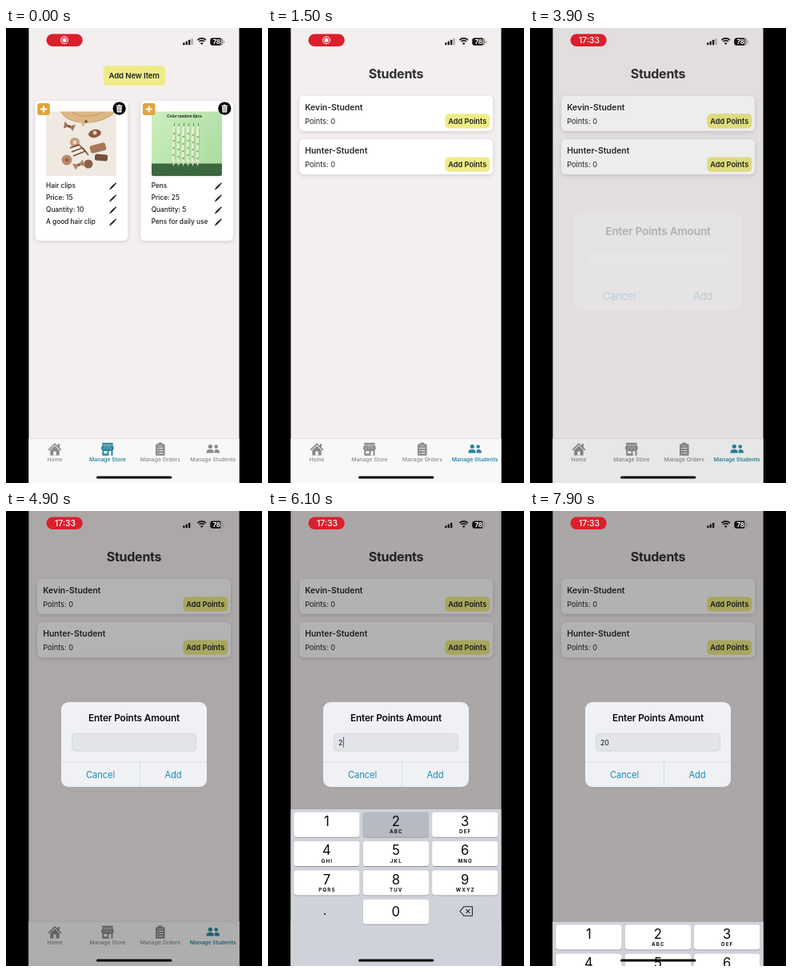
An HTML page with a canvas that plays this animation: 320x569 px, repeating every 8000 ms.

```html
<!DOCTYPE html>
<html lang="en">
<head>
<meta charset="utf-8">
<title>Classroom store</title>
<style>
html, body { margin: 0; width: 100%; height: 100%; overflow: hidden; background: #000; }
canvas { display: block; width: 100%; height: 100%; }
</style>
</head>
<body>
<canvas id="stage"></canvas>
<script>
const W = 320, H = 569, LOOP = 8000;
const canvas = document.getElementById('stage');
const c = canvas.getContext('2d');
const ratio = window.devicePixelRatio || 1;
canvas.width = W * ratio;
canvas.height = H * ratio;

const PAGE = '#f4efef', YELLOW = '#efec88', INK = '#222', TEAL = '#2b87a1', GRAY = '#8b8b8c', LINK = '#1a8abb';

// Moments of the story, in ms
const T = { tab: 1200, clock: 2600, alert: 3860, keysIn: 5210, two: 6080, zero: 6520, keysOut: 7763 };

function spring(ms, w) {
  if (ms <= 0) return 0;
  const x = w * ms / 1000;
  return 1 - (1 + x) * Math.exp(-x);
}

function box(x, y, w, h, r, fill, stroke, line = 1) {
  c.beginPath();
  c.roundRect(x, y, w, h, r);
  if (fill) { c.fillStyle = fill; c.fill(); }
  if (stroke) { c.strokeStyle = stroke; c.lineWidth = line; c.stroke(); }
}

function disc(x, y, r, fill) {
  c.beginPath();
  c.arc(x, y, r, 0, Math.PI * 2);
  c.fillStyle = fill;
  c.fill();
}

function poly(points, fill) {
  c.beginPath();
  points.forEach(([x, y]) => c.lineTo(x, y));
  c.closePath();
  c.fillStyle = fill;
  c.fill();
}

function line(points, color, width) {
  c.beginPath();
  points.forEach(([x, y], i) => i ? c.lineTo(x, y) : c.moveTo(x, y));
  c.strokeStyle = color;
  c.lineWidth = width;
  c.stroke();
}

// y is the middle of the capital letters
function text(s, x, y, size, weight = 400, color = INK, align = 'left', gap = 0) {
  c.font = `${weight} ${size}px Inter, "Liberation Sans", sans-serif`;
  c.letterSpacing = gap + 'px';
  c.textAlign = align;
  c.fillStyle = color;
  c.fillText(s, x, y + size * 0.364);
}

function shadowed(blur, dy, alpha, draw) {
  c.save();
  c.shadowColor = `rgba(60,40,40,${alpha})`;
  c.shadowBlur = blur * ratio;
  c.shadowOffsetY = dy * ratio;
  draw();
  c.restore();
}

function at(x, y, draw, angle = 0) {
  c.save();
  c.translate(x, y);
  c.rotate(angle);
  draw();
  c.restore();
}

function clipped(x, y, w, h, r, draw) {
  c.save();
  c.beginPath();
  c.roundRect(x, y, w, h, r);
  c.clip();
  draw();
  c.restore();
}

function pencil(x, y) {
  at(x, y, () => {
    box(-3.6, -0.9, 7.2, 1.8, 0.2, '#111');
    poly([[-3.9, -0.9], [-6.2, 0], [-3.9, 0.9]], '#111');
    box(4.1, -0.9, 1.8, 1.8, 0.5, '#111');
  }, -Math.PI / 4);
}

function trash(x, y) {
  disc(x, y, 8.1, '#050505');
  box(x - 3.9, y - 3.8, 7.8, 1.1, 0.4, '#fff');
  box(x - 1.4, y - 4.8, 2.8, 1.4, 0.5, '#fff');
  poly([[x - 3.3, y - 2], [x + 3.3, y - 2], [x + 2.8, y + 5], [x - 2.8, y + 5]], '#fff');
  for (const dx of [-1.4, 0, 1.4]) line([[x + dx, y - 0.9], [x + dx, y + 3.9]], '#222', 0.5);
}

function plus(x, y) {
  box(x, y, 15.6, 15, 3, '#dfa53d');
  line([[x + 3.8, y + 7.5], [x + 11.8, y + 7.5]], '#fff', 1.8);
  line([[x + 7.8, y + 3.5], [x + 7.8, y + 11.5]], '#fff', 1.8);
}

function bow(x, y, color, angle) {
  at(x, y, () => {
    poly([[0, 0], [-7, -4.5], [-6, 4.5]], color);
    poly([[0, 0], [7, -4.5], [6, 4.5]], color);
    disc(0, 0, 1.8, '#7b5238');
  }, angle);
}

function clipsPhoto() {
  box(50, 104, 88, 81, 0, '#f0e9e2');
  c.beginPath();
  c.ellipse(104, 98, 36, 20, -0.1, 0, Math.PI * 2);
  c.fillStyle = '#dcb887';
  c.fill();
  c.strokeStyle = '#c4965f';
  c.lineWidth = 1;
  c.stroke();
  c.beginPath();
  c.ellipse(104, 98, 24, 12, -0.1, 0, Math.PI * 2);
  c.stroke();
  bow(79, 123, '#a57353', 0.3);
  bow(100, 117, '#d9b993', -0.5);
  disc(86, 143, 6, '#c79a78');
  disc(86, 143, 2.4, '#ead7c3');
  c.beginPath();
  c.ellipse(111, 132, 8, 5, -0.2, 0, Math.PI * 2);
  c.fillStyle = '#8a5a3d';
  c.fill();
  disc(111, 131, 2.5, '#e8cdb2');
  for (let i = 0; i < 3; i++) {
    line([[80 + i * 2, 150 + i * 5], [91 + i * 4, 146 + i * 4], [99 + i * 2, 153 + i * 3]], '#704832', 1.4);
  }
  at(115, 150, () => box(-10, -5, 20, 10, 3, '#a9785b'), -0.25);
  at(119, 162, () => box(-8, -4, 16, 8, 2, '#74503d'), 0.1);
  bow(91, 171, '#b57f62', -0.4);
  disc(76, 165, 6.5, '#b98b6b');
  disc(76, 165, 2.5, '#93654a');
  disc(103, 170, 5.5, '#8b6148');
}

function pensPhoto() {
  const g = c.createLinearGradient(182, 104, 270, 172);
  g.addColorStop(0, '#cdeebf');
  g.addColorStop(1, '#a9dca0');
  box(182, 104, 88, 81, 0, g);
  box(182, 169.5, 88, 16, 0, '#3c6840');
  text('Color random 6pcs', 223, 110, 4.7, 'italic 700', '#18251a', 'center');
  for (let i = 0; i < 6; i++) {
    at(210 + i * 6, 146, () => {
      box(-0.6, -27, 1.2, 5, 0.5, '#6f9a65');
      box(-1.9, -23, 3.8, 45, 1.4, '#e6f2d5');
      box(0.8, -22, 1.1, 42, 0.4, '#a1c68a');
      for (let k = 0; k < 4; k++) disc(-0.4, -14 + k * 9 + (i % 3) * 2, 1.2, '#82b46d');
      poly([[-1.8, 21], [1.8, 21], [0, 27]], '#d6ddc2');
    }, 0.02);
  }
}

function storeCard(x, rows, photo) {
  shadowed(5, 1.5, 0.17, () => box(x, 91, 115.6, 175, 5, '#fff'));
  clipped(x + 13.6, 104.5, 88, 80.8, 3, photo);
  plus(x + 2.6, 94);
  trash(x + 105, 100.6);
  rows.forEach((row, i) => {
    const y = 197.3 + i * 15;
    text(row, x + 13.4, y, 8.3, 500, '#1d1d1d');
    pencil(x + 96.8, y + 0.8);
  });
}

function storePage() {
  box(121.6, 47, 77.4, 25, 5, YELLOW);
  text('Add New Item', 160.2, 59.7, 9.6, 600, INK, 'center', -0.13);
  storeCard(36.6, ['Hair clips', 'Price: 15', 'Quantity: 10', 'A good hair clip'], clipsPhoto);
  storeCard(168.3, ['Pens', 'Price: 25', 'Quantity: 5', 'Pens for daily use'], pensPhoto);
}

function studentsPage() {
  text('Students', 160, 57.6, 16, 700, '#303030', 'center', -0.24);
  ['Kevin-Student', 'Hunter-Student'].forEach((name, i) => {
    const y = 85 + i * 54.2;
    shadowed(5, 1.5, 0.17, () => box(39.3, y, 241.6, 43.7, 5, '#fff'));
    text(name, 46.2, y + 14, 10.4, 600, '#2a2a2a');
    text('Points: 0', 46.2, y + 31.3, 9.2, 400, '#222');
    box(221.4, y + 22.2, 56, 18.3, 5, YELLOW);
    text('Add Points', 249.2, y + 31.4, 9.2, 600, INK, 'center');
  });
}

const icons = [
  col => {
    poly([[-8.5, 0.6], [0, -7.8], [8.5, 0.6], [7.4, 1.7], [0, -5.5], [-7.4, 1.7]], col);
    poly([[-5.7, 1.2], [0, -4.2], [5.7, 1.2], [5.7, 7.7], [-5.7, 7.7]], col);
    box(3.8, -6.8, 2.2, 4.5, 0, col);
    box(-1.7, 2.8, 3.4, 4.9, 0, '#f9f8f8');
  },
  col => {
    box(-6.8, -8, 13.6, 2.2, 0.6, col);
    poly([[-6.6, -5.2], [6.6, -5.2], [8, -1.5], [-8, -1.5]], col);
    for (let i = 0; i < 4; i++) {
      disc(-6 + i * 4, -0.9, 1.9, col);
      line([[-3 + i * 2, -5], [-4 + i * 8 / 3, -1.2]], '#f9f8f8', 0.4);
    }
    box(-6.6, 0, 13.2, 8, 0.6, col);
    box(-4.6, 2.2, 4.2, 3.4, 0, '#f9f8f8');
    box(1.6, 2.2, 3, 5.8, 0, '#f9f8f8');
  },
  col => {
    box(-5.8, -6.5, 11.6, 14.5, 1.5, col);
    box(-2.6, -8.2, 5.2, 3.4, 1, col);
    line([[-2.6, -4.3], [2.6, -4.3]], '#f9f8f8', 0.6);
    for (let i = 0; i < 3; i++) {
      disc(-3.2, -1.3 + i * 3.2, 0.75, '#f9f8f8');
      line([[-1.4, -1.3 + i * 3.2], [3.6, -1.3 + i * 3.2]], '#f9f8f8', 1);
    }
  },
  col => {
    disc(-3.4, -3.4, 2.6, col);
    disc(4, -3.2, 2.3, col);
    box(-8.3, 0.3, 9.4, 4.4, [4, 4, 0.5, 0.5], col);
    box(2, 0.3, 6.3, 4.4, [2, 4, 0.5, 0.5], col);
  }
];

function tabBar(active) {
  box(28, 513.5, 264, 56, 0, '#f9f8f8');
  box(28, 513.2, 264, 0.6, 0, '#d9d5d5');
  ['Home', 'Manage Store', 'Manage Orders', 'Manage Students'].forEach((label, i) => {
    const x = 61 + i * 65.9, on = i === active, col = on ? TEAL : GRAY;
    at(x, 526.7, () => icons[i](col));
    text(label, x, 539.8, 6.8, on ? 600 : 500, col, 'center');
  });
}

function statusBar(showClock) {
  box(50.5, 7.6, 45.3, 15.4, 7.7, '#dc1f2c');
  if (showClock) {
    text('17:33', 74, 15.3, 10.3, 500, '#fff', 'center');
  } else {
    disc(73, 15.2, 2.6, '#fff');
    c.beginPath();
    c.arc(73, 15.2, 4.5, 0, Math.PI * 2);
    c.strokeStyle = '#fff';
    c.lineWidth = 1;
    c.stroke();
  }
  for (let i = 0; i < 4; i++) {
    const h = 3 + i * 1.75;
    box(221.2 + i * 3.4, 21.2 - h, 2.3, h, 0.6, i < 3 ? '#111' : '#a9a5a5');
  }
  c.strokeStyle = '#111';
  c.lineWidth = 1.6;
  for (const r of [7.4, 4.7]) {
    c.beginPath();
    c.arc(244.7, 20.3, r, -Math.PI * 0.75, -Math.PI * 0.25);
    c.stroke();
  }
  poly([[242.9, 18.9], [244.7, 18], [246.5, 18.9], [244.7, 21]], '#111');
  clipped(255.3, 12.6, 16, 9.2, 3, () => {
    box(255, 12, 17, 11, 0, '#96928f');
    box(255, 12, 13, 11, 0, '#111');
  });
  box(272, 15.7, 1.1, 3.2, [0, 1, 1, 0], '#96928f');
  text('78', 263.2, 17.3, 8, 700, '#fff', 'center', -0.2);
}

function alertBox(p, t) {
  c.save();
  c.globalAlpha = p;
  c.translate(160, 292);
  c.scale(1.2 - 0.2 * p, 1.2 - 0.2 * p);
  c.translate(-160, -292);
  box(69, 239, 182, 106, 9, '#eff1f5');
  text('Enter Points Amount', 160, 258.9, 11.9, 600, '#0d0d0d', 'center', -0.18);
  box(82.6, 278.2, 155, 22, 4, '#e2e4e9', '#cdd1d6', 0.7);
  line([[69, 314], [251, 314]], '#d0d3d8', 0.7);
  line([[167.5, 314], [167.5, 345]], '#d0d3d8', 0.7);
  text('Cancel', 118, 329.6, 11.2, 400, LINK, 'center', -0.1);
  text('Add', 209, 329.6, 11.2, 400, LINK, 'center', -0.1);
  const typed = t < T.two ? '' : t < T.zero ? '2' : '20';
  text(typed, 88, 289.5, 8.8, 400, '#111');
  if (t >= T.keysIn && t < T.keysOut) {
    box(88.2 + typed.length * 5.6, 282.4, 1.2, 13.4, 0.5, '#347fa5');
  }
  c.restore();
}

const letters = ['', 'ABC', 'DEF', 'GHI', 'JKL', 'MNO', 'PQRS', 'TUV', 'WXYZ'];

function key(label, sub, col, row, top, down) {
  const x = 32.3 + col * 86.4, y = top + 3.8 + row * 36.3;
  box(x, y + 0.8, 82.3, 31, 3.4, '#8e9096');
  box(x, y, 82.3, 31, 3.4, down ? '#b6bac3' : '#fff');
  text(label, x + 41.1, y + (row < 3 ? 11.2 : 15.4), 16.6, 400, '#080808', 'center');
  // half a gap to the right keeps spaced letters centred
  text(sub, x + 41.6, y + 24.4, 6.2, 700, '#111', 'center', 1.1);
}

function keyboard(t) {
  const shown = spring(t - T.keysIn, 18.3) - spring(t - T.keysOut, 18.3);
  if (shown < 0.002) return;
  const top = 569 - 196 * shown;
  const held = start => t >= start && t < start + 110;
  box(28, top, 264, 200, 0, '#cfd2d9');
  letters.forEach((sub, i) => key(String(i + 1), sub, i % 3, Math.floor(i / 3), top, i === 1 && held(T.two)));
  key('0', '', 1, 3, top, held(T.zero));
  disc(71, top + 131, 1.1, '#111');
  at(248, top + 127.5, () => {
    c.beginPath();
    [[-8, 0], [-3, -5.8], [7.4, -5.8], [7.4, 5.8], [-3, 5.8]].forEach(p => c.lineTo(...p));
    c.closePath();
    c.lineJoin = 'round';
    c.strokeStyle = '#222';
    c.lineWidth = 1.1;
    c.stroke();
    line([[-0.4, -2.4], [4.4, 2.4]], '#222', 1.1);
    line([[4.4, -2.4], [-0.4, 2.4]], '#222', 1.1);
  });
}

function draw(t) {
  c.setTransform(ratio, 0, 0, ratio, 0, 0);
  box(0, 0, W, H, 0, '#000');
  c.save();
  c.beginPath();
  c.rect(28.5, 0, 263, H);
  c.clip();
  box(28, 0, 264, H, 0, PAGE);
  const onStore = t < T.tab;
  if (onStore) storePage(); else studentsPage();
  tabBar(onStore ? 1 : 3);
  const p = spring(t - T.alert, 22.85);
  if (p > 0) {
    box(28, 0, 264, H, 0, `rgba(0,0,0,${0.3 * p})`);
    alertBox(p, t);
  }
  keyboard(t);
  statusBar(t >= T.clock);
  box(113, 560.4, 94.4, 3.2, 1.6, '#000');
  c.restore();
}

function tick(now) {
  draw(now % LOOP);
  requestAnimationFrame(tick);
}
draw(0);
requestAnimationFrame(tick);
</script>
</body>
</html>
```
